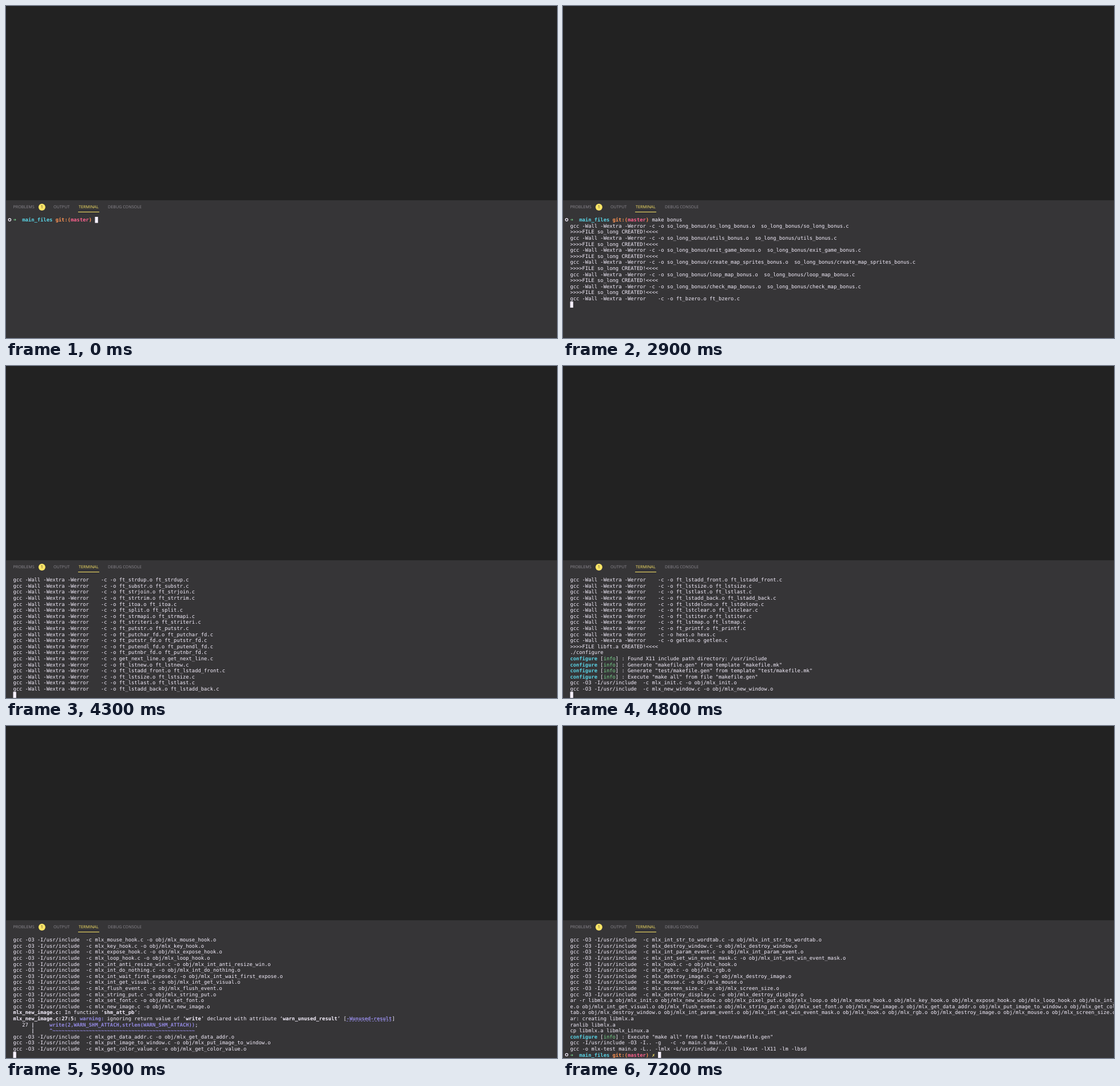
An HTML page that plays this animation: 963x581 px, repeating every 8000 ms.

```html
<!DOCTYPE html>
<html lang="en">
<head>
<meta charset="utf-8">
<title>Terminal build</title>
<style>
html, body { margin: 0; width: 100%; height: 100%; overflow: hidden; background: #222; }
svg { display: block; width: 963px; height: 581px; }
text { white-space: pre; text-rendering: geometricPrecision; }
.tabs { font: 7.2px "Open Sans", "Noto Sans", sans-serif; fill: #8b888f; }
.tabs .on { fill: #fce566; }
.term { font: 8.8px "DejaVu Sans Mono", monospace; fill: #f7f1ff; }
.w, .p, .u, .c, .o, .r, .y, .a { font-weight: bold; }
.p, .u { fill: #948ae3; }
.c { fill: #5ad4e6; }
.o { fill: #fd9353; }
.r { fill: #fc618d; }
.y { fill: #fce566; }
.a, .g { fill: #7bd88f; }
</style>
</head>
<body>
<svg viewBox="0 0 963 581">
  <rect width="963" height="581" fill="#222222"/>
  <rect y="340" width="963" height="241" fill="#363537"/>
  <g class="tabs">
    <text x="12.4" y="354.4">PROBLEMS</text>
    <circle cx="62.8" cy="352" r="6" fill="#fce566"/>
    <text x="62.8" y="354.4" text-anchor="middle" style="fill:#363537">1</text>
    <text x="83" y="354.4">OUTPUT</text>
    <text x="127" y="354.4" class="on">TERMINAL</text>
    <rect x="126" y="360" width="37" height="1" fill="#fce566"/>
    <text x="178" y="354.4">DEBUG CONSOLE</text>
  </g>
  <g id="rows" class="term"></g>
  <circle id="mark" cx="6.4" r="2.2" fill="none" stroke="#f7f1ff" stroke-width="1.2"/>
  <rect id="cursor" width="5.3" height="10.6" fill="#f7f1ff"/>
</svg>
<script>
const LOOP = 8000, LEFT = 12.4, TOP = 369, COL = 5.296, ROW = 10.59, LAST_ROW = 19;
const rowsBox = document.getElementById('rows');
const mark = document.getElementById('mark');
const cursor = document.getElementById('cursor');

// Styled runs are written as {class text}.
const prompt = '{a ➜}  {c main_files} {o git:(}{r master}{o )} ';
const command = 'make bonus';
const flags = 'gcc -Wall -Wextra -Werror ';
const info = '{c configure} [{g info}] : ';
const words = s => s.trim().split(/\s+/);

const bonus = words('so_long utils exit_game create_map_sprites loop_map check_map')
  .flatMap(n => {
    const path = `so_long_bonus/${n}_bonus`;
    return [`${flags}-c -o ${path}.o  ${path}.c`, '>>>>FILE so_long CREATED!<<<<'];
  });

const libft = words(`bzero isalpha isdigit isalnum isascii isprint strlen memset memcpy memmove
  strlcpy strlcat toupper tolower strchr strrchr strncmp memchr memcmp strnstr atoi calloc
  strdup substr strjoin strtrim itoa split strmapi striteri putstr putchar_fd putstr_fd
  putendl_fd putnbr_fd get_next_line lstnew lstadd_front lstsize lstlast lstadd_back
  lstdelone lstclear lstiter lstmap printf hexs getlen`)
  .map(n => /^(get_next_line|hexs|getlen)$/.test(n) ? n : 'ft_' + n)
  .map(n => `${flags}   -c -o ${n}.o ${n}.c`);

const mlx = words(`init new_window pixel_put loop mouse_hook key_hook expose_hook loop_hook
  int_anti_resize_win int_do_nothing int_wait_first_expose int_get_visual flush_event
  string_put set_font new_image get_data_addr put_image_to_window get_color_value
  clear_window xpm int_str_to_wordtab destroy_window int_param_event
  int_set_win_event_mask hook rgb destroy_image mouse screen_size destroy_display`)
  .map(n => 'mlx_' + n);
const mlxBuild = mlx.map(n => `gcc -O3 -I/usr/include  -c ${n}.c -o obj/${n}.o`);

const warning = [
  '{w mlx_new_image.c:} In function ‘{w shm_att_pb}’:',
  '{w mlx_new_image.c:27:5:} {p warning:} ignoring return value of ‘{w write}’ declared with attribute ‘{w warn_unused_result}’ [{u -Wunused-result}]',
  '   27 {w |}     {p write(2,WARN_SHM_ATTACH,strlen(WARN_SHM_ATTACH))};',
  `      {w |}     {p ^${'~'.repeat(47)}}`
];
mlxBuild.splice(mlx.indexOf('mlx_new_image') + 1, 0, ...warning);

// The archive command wraps past the right edge.
const archive = 'ar -r libmlx.a ' + mlx.map(n => `obj/${n}.o`).join(' ');
const wrap1 = archive.indexOf('e.o obj/mlx_int_get_visual');
const wrap2 = archive.indexOf('tab.o obj/mlx_destroy_window');

const lines = [
  prompt, ...bonus, ...libft,
  '>>>>FILE libft.a CREATED!<<<<',
  './configure',
  info + 'Found X11 include path directory: /usr/include',
  info + 'Generate "makefile.gen" from template "makefile.mk"',
  info + 'Generate "test/makefile.gen" from template "test/makefile.mk"',
  info + 'Execute "make all" from file "makefile.gen"',
  ...mlxBuild,
  archive.slice(0, wrap1), archive.slice(wrap1, wrap2), archive.slice(wrap2),
  'ar: creating libmlx.a',
  'ranlib libmlx.a',
  'cp libmlx.a libmlx_Linux.a',
  info + 'Execute "make all" from file "test/makefile.gen"',
  'gcc -I/usr/include -O3 -I.. -g   -c -o main.o main.c',
  'gcc -o mlx-test main.o -L.. -lmlx -L/usr/include/../lib -lXext -lX11 -lm -lbsd',
  prompt + '{y ✗} '
];

const keyTimes = [800, 900, 1000, 1100, 1200, 1500, 1700, 1900, 2100, 2400];
// [time, finished lines]
const output = [
  [2700, 3], [2800, 8], [2900, 14], [3100, 18], [3200, 23], [3400, 28], [3500, 32],
  [3700, 37], [3800, 41], [4000, 46], [4100, 49], [4300, 54], [4500, 58], [4600, 67],
  [4800, 69], [4900, 71], [5100, 75], [5300, 78], [5400, 80], [5600, 82], [5700, 87],
  [5900, 90], [6000, 92], [6200, 94], [6300, 96], [6400, 98], [6600, 100],
  [6800, 102], [6900, 109], [7100, 110], [7200, 111]
];

function add(name, attrs, content = '') {
  const el = document.createElementNS('http://www.w3.org/2000/svg', name);
  for (const key in attrs) el.setAttribute(key, attrs[key]);
  el.textContent = content;
  rowsBox.append(el);
}

// Draws one line and returns the column after it.
function drawLine(line, row) {
  const y = TOP + row * ROW + 8.3;
  let col = 0;
  for (const [run, style, styled] of line.matchAll(/\{(\w) ([^}]*)\}|[^{]+/g)) {
    const content = style ? styled : run;
    const x = LEFT + col * COL;
    add('text', { x, y, class: style || 'n' }, content);
    col += content.length;
    if (style === 'u') {
      add('line', { x1: x, x2: LEFT + col * COL, y1: y + 1.5, y2: y + 1.5,
        stroke: '#948ae3', 'stroke-width': 0.8, 'stroke-dasharray': '3 2' });
    }
  }
  return col;
}

function draw(typed, done) {
  const top = Math.max(0, done - LAST_ROW);
  const atPrompt = done === 0 || done === lines.length - 1;
  const shown = lines.slice(top, done + (atPrompt ? 1 : 0));
  let col = 0;
  rowsBox.replaceChildren();
  shown.forEach((line, row) => {
    const end = drawLine(top + row === 0 ? line + command.slice(0, typed) : line, row);
    if (atPrompt) col = end;
  });
  cursor.setAttribute('x', LEFT + 0.1 + col * COL);
  cursor.setAttribute('y', TOP + (done - top) * ROW);

  const markRow = shown.findIndex(line => line.startsWith(prompt));
  mark.setAttribute('visibility', markRow < 0 ? 'hidden' : 'visible');
  mark.setAttribute('cy', TOP + 5.1 + markRow * ROW);
}

let state = '';
function update(now) {
  const t = now % LOOP;
  const typed = keyTimes.filter(k => k <= t).length;
  const done = output.reduce((n, [time, count]) => time <= t ? count : n, 0);
  const next = typed + ':' + done;
  if (next !== state) {
    state = next;
    draw(typed, done);
  }
}

const start = performance.now();
function frame() {
  update(performance.now() - start);
  requestAnimationFrame(frame);
}
frame();
</script>
</body>
</html>
```
